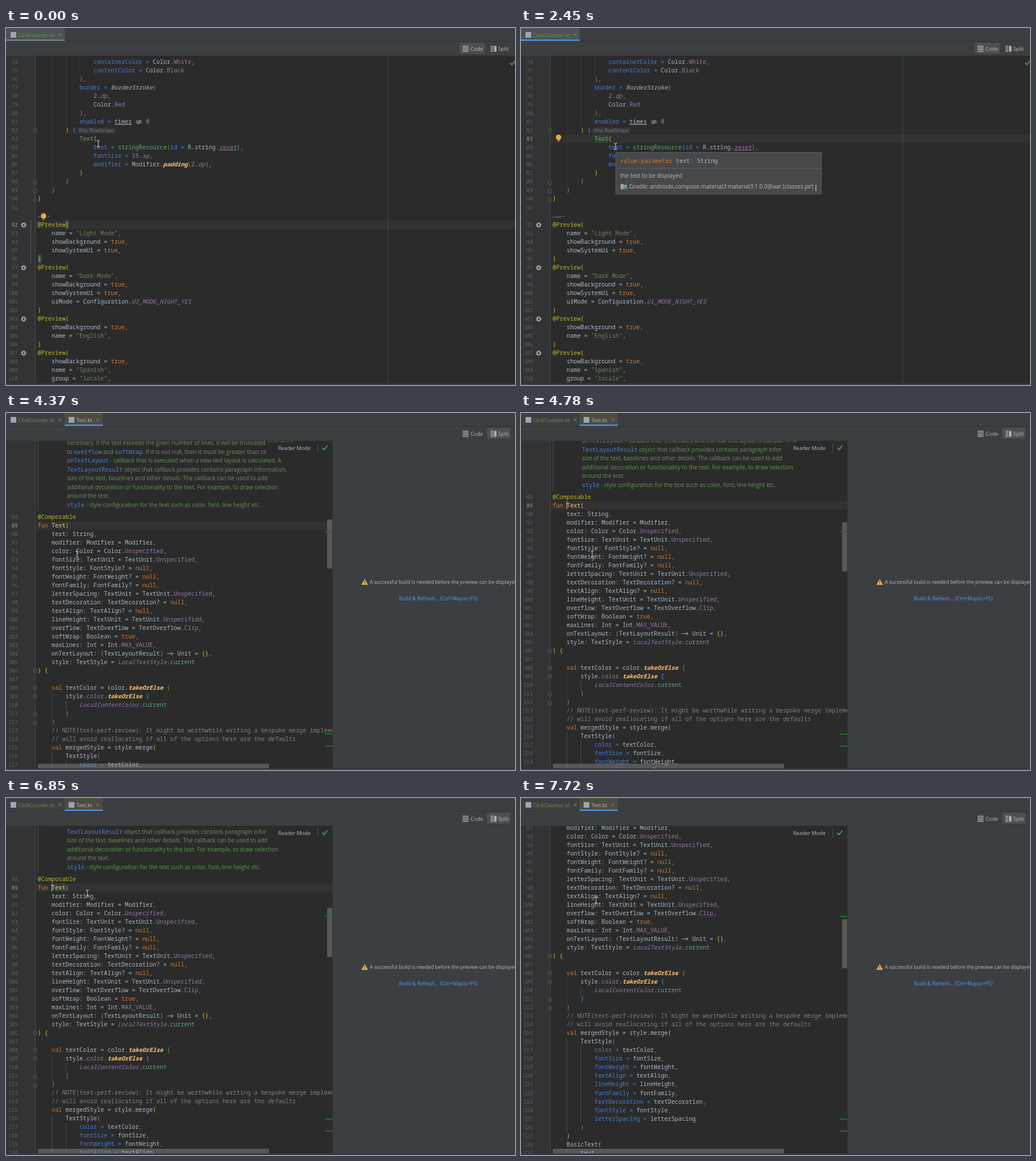
These frames come from a looping animation (894 by 627 pixels, 7850 ms). An HTML page:

```html
<!DOCTYPE html>
<html lang="en">
<head>
<meta charset="utf-8">
<title>Code editor</title>
<style>
html, body { margin: 0; width: 100%; height: 100%; overflow: hidden; background: #3c3f41; }
#stage { position: relative; width: 894px; height: 627px; overflow: hidden; background: #3c3f41;
  font: 9.1px/15px "Open Sans", "Noto Sans", sans-serif; color: #bbb; }
#stage div, #stage svg.at { position: absolute; white-space: pre; }
svg.at { width: 1px; height: 1px; overflow: visible; fill: none; }
.view { left: 0; top: 48px; height: 576px; overflow: hidden; background: #2b2b2b; }
.layer { left: 0; top: -48px; }
.code, .num, .doc code { font-family: "Noto Sans Mono", "DejaVu Sans Mono", monospace; }
.code { left: 55.5px; font-size: 10.23px; color: #a9b7c6; }
.num { left: 0; width: 20.5px; text-align: right; font-size: 8.9px; color: #606366; }
.num.on { color: #a4a3a3; }
.doc { left: 107px; font-size: 10.02px; color: #629755; }
.doc code { font-size: 10.2px; color: #4683d9; }
.code b { font-weight: normal; }
.code .k { color: #cc7832; }
.code .s { color: #6a8759; }
.code .c { color: #808080; }
.code .d { color: #6897bb; }
.code .n { color: #467cda; }
.code .p, .code .q { color: #9876aa; }
.code .a { color: #bbb529; }
.code .g { color: #67a37c; }
.code .t { color: #ffc66d; }
.code .f { color: #ffc66d; font-weight: 600; }
.code .q, .code .f, .code .i { font-style: italic; }
.code .u { text-decoration: underline; }
.code .r1 { color: #e8ba36; }
.code .r2 { color: #54a857; }
.code .r3 { color: #359ff4; }
.raw .code b:not(.k):not(.c) { color: inherit; font-style: normal; font-weight: normal; }
.lig { width: 12.28px; height: 10px; vertical-align: -2px; fill: none; stroke: currentColor; }
.pick { background: #4c5052; border-radius: 2px; }
</style>
</head>
<body>
<div id="stage"></div>
<script>
const LOOP = 7850, PITCH = 15.03;
const stage = document.getElementById('stage');

function div(parent, css, html = '', cls = '') {
  const el = document.createElement('div');
  el.className = cls;
  el.style.cssText = css;
  el.innerHTML = html;
  parent.append(el);
  return el;
}
const bar = (parent, x, y, w, h, color) =>
  div(parent, `left:${x}px;top:${y}px;width:${w}px;height:${h}px;background:${color}`);
// y is the middle of the text line
const label = (parent, x, y, text, css = '') =>
  div(parent, `left:${x}px;top:${y - 7.5}px;${css}`, text);
function icon(parent, x, y, shapes) {
  parent.insertAdjacentHTML('beforeend',
    `<svg class="at" style="left:${x}px;top:${y}px">${shapes}</svg>`);
  return parent.lastElementChild;
}
const show = (el, on) => { el.style.display = on ? '' : 'none'; };

const LIG = {
  '≠': '<path d="M1 3.6H11.5M1 6.6H11.5M8.3 1L4.3 9.3"/>',
  '→': '<path d="M.5 5H11M8 2L11 5L8 8"/>'
};
function paint(src) {
  return src
    .replace(/"[^"]*"/g, '<b class=s>$&</b>')
    .replace(/,/g, '<b class=k>,</b>')
    .replace(/\b(true|null|fun|val)\b/g, '<b class=k>$1</b>')
    .replace(/@\w+/g, '<b class=a>$&</b>')
    .replace(/\[(\w+) (.*?)\]/g, '<b class=$1>$2</b>')
    .replace(/[≠→]/g, c => `<svg class=lig viewBox="0 0 12 10">${LIG[c]}</svg>`);
}
function codeLines(layer, first, yOf, src) {
  const nums = {};
  src.split('\n').forEach((line, i) => {
    const n = first + i, top = yOf(n) - 7.5;
    nums[n] = div(layer, `top:${top}px`, n, 'num');
    div(layer, `top:${top}px`, paint(line), 'code');
  });
  return nums;
}
const FOLD = 'fill="#2b2b2b" stroke="#686b6e" stroke-width=".8"';
const fold = (layer, y, end) => icon(layer, 51, y,
  `<path ${end ? 'transform="scale(1 -1)"' : ''} d="M-2.8-3.3H2.8V1L0 3.5L-2.8 1Z" ${FOLD}/><path d="M-1.4 0H1.4" stroke="#686b6e" stroke-width=".8"/>`);
const bulb = (layer, y) => icon(layer, 66, y,
  '<circle cy="-1" r="4.7" fill="#f2a93b"/><path d="M-2 4.2H2M-1.5 5.7H1.5" stroke="#a8a8a8"/>');
const check = (layer, x, y) => icon(layer, x, y,
  '<path d="M-4.5 0L-1.5 3.5L4.5-4" stroke="#499c54" stroke-width="2"/>');

// First file
const viewA = div(stage, 'width:894px', '', 'view');
const layA = div(viewA, '', '', 'layer');
const yA = n => 59.5 + (n - 74 + (n > 91)) * PITCH;
bar(layA, 0, 48, 51, 576, '#313335');
const rowA = bar(layA, 51, 0, 843, 15, '#323232');
bar(layA, 51, 48, 1, 576, '#48494b');
bar(layA, 670, 48, 1, 576, '#47494b');
bar(layA, 80, 48, 1, 230, '#373737');
bar(layA, 105, 48, 1, 125, '#373737');
bar(layA, 129, 48, 1, 34, '#373737');
const scope = bar(layA, 43, 338, 1, 75, '#5d6063');
const pairA = bar(layA, 104.4, 338, 6, 15, '#3b514d');
const pairB = bar(layA, 55.5, 398, 6.2, 15, '#3b514d');
const usage = bar(layA, 129, 188, 25, 14, '#344134');
const numsA = codeLines(layA, 73, yA,
`            [n colors =] ButtonDefaults.[i buttonColors][r2 (]
                [n containerColor =] Color.[p White],
                [n contentColor =] Color.[p Black]
            [r2 )],
            [n border =] [i BorderStroke][r2 (]
                [d 2].[q dp],
                Color.[p Red]
            [r2 )],
            [n enabled =] [u times] ≠ [d 0]
        [r1 )] [r3 {]
            [g Text][r1 (]
                [n text =] [g stringResource][r2 (][n id =] R.string.[q <u>reset</u>][r2 )],
                [n fontSize =] [d 15].[q sp],
                [n modifier =] Modifier.[f padding][r2 (][d 2].[q dp][r2 )],
            [r1 )]
        [r3 }]
    [r2 }]
[r1 }]

@Preview[r1 (]
    name = "Light Mode",
    showBackground = true,
    showSystemUi = true,
[r1 )]
@Preview[r1 (]
    name = "Dark Mode",
    showBackground = true,
    showSystemUi = true,
    uiMode = Configuration.[q UI_MODE_NIGHT_YES]
[r1 )]
@Preview[r1 (]
    showBackground = true,
    name = "English",
[r1 )]
@Preview[r1 (]
    showBackground = true,
    name = "Spanish",
    group = "locale",`);
[82, 88, 89, 90].forEach(n => fold(layA, yA(n) + 1, n > 82));
[92, 97, 103, 107].forEach(n => icon(layA, 31, yA(n) + .7,
  '<g stroke="#afb1b3"><circle r="2.6" stroke-width="1.5"/><circle r="4" stroke-width="1.5" stroke-dasharray="1.57"/></g>'));
div(layA, 'left:124px;top:175px;width:69px;height:11px;background:#353637;border-radius:3px');
label(layA, 128, 180, 'this: RowScope', 'font-size:8.7px;color:#7d7f81');
label(layA, 55.5, 330.5, 'new *', 'font-size:8px;color:#787878');
check(layA, 890, 61);
const bulbOld = bulb(layA, 331), bulbNew = bulb(layA, 193);
const caretA = bar(layA, 141, 189, 1.4, 13, '#d0d0d0');

const popup = div(layA, 'left:166px;top:218px;width:360px;height:72px;background:#46484a;border:1px solid #5b5d5f');
bar(popup, 0, 27, 360, 1, '#5b5d5f');
div(popup, 'left:7px;top:7px', '<b class=k>value-parameter</b> text: String', 'code');
label(popup, 7, 40, 'the text to be displayed', 'font-size:10px');
label(popup, 23, 59, 'Gradle: androidx.compose.material3:material3:1.0.0@aar (classes.jar)', 'font-size:10.02px');
icon(popup, 8, 54, '<path d="M0 1H4L5.5 2.5H11V10H0Z" fill="#9aa7b0"/><path d="M6 10V5M8.3 10V4M10.6 10V6" stroke="#46484a"/><path d="M7 10V5M9.4 10V4M11.6 10V6" stroke="#62a3c4" stroke-width="1.2"/>');
icon(popup, 350.5, 62, '<g fill="#ccc"><circle cy="-4" r="1.2"/><circle r="1.2"/><circle cy="4" r="1.2"/></g>');

// Second file
const viewB = div(stage, 'width:573px', '', 'view');
bar(viewB, 0, 0, 51, 576, '#313335');
const layB = div(viewB, '', '', 'layer');
const yB = n => (n - 88) * PITCH;
bar(layB, 51, 7.5, 522, 15, '#323232');
bar(viewB, 51, 0, 1, 576, '#48494b');
bar(layB, 56, -300, 1, 290, '#4a5547');
const guide = (x, from, to, color) =>
  bar(layB, x, yB(from) - 7, 1, (to - from + 1) * PITCH, color);
guide(80, 109, 111, '#3d443b');
guide(105, 110, 110, '#4a4d50');
guide(80, 116, 126, '#5e4c38');
guide(105, 117, 125, '#3e4f3e');
guide(80, 129, 135, '#5e4c38');
const usageB = bar(layB, 80, 8, 25, 14, '#344134');
[
  'the text will be positioned as if there was unlimited horizontal space. If `softWrap` is',
  'false, `overflow` and TextAlign may have unexpected effects.',
  '`maxLines` - an optional maximum number of lines for the text to span, wrapping if',
  'necessary. If the text exceeds the given number of lines, it will be truncated according',
  'to `overflow` and `softWrap`. If it is not null, then it must be greater than zero.',
  '`onTextLayout` - callback that is executed when a new text layout is calculated. A',
  '`TextLayoutResult` object that callback provides contains paragraph information,',
  'size of the text, baselines and other details. The callback can be used to add',
  'additional decoration or functionality to the text. For example, to draw selection',
  'around the text.',
  '`style` - style configuration for the text such as color, font, line height etc.'
].forEach((line, i) => div(layB, `top:${-28.5 - (10 - i) * 15.45}px`,
  line.replace(/`(\w+)`/g, '<code>$1</code>'), 'doc'));
const numsB = codeLines(layB, 88, yB,
`@Composable
fun [t Text](
    text: String,
    modifier: Modifier = Modifier,
    color: Color = Color.[p Unspecified],
    fontSize: TextUnit = TextUnit.[p Unspecified],
    fontStyle: FontStyle? = null,
    fontWeight: FontWeight? = null,
    fontFamily: FontFamily? = null,
    letterSpacing: TextUnit = TextUnit.[p Unspecified],
    textDecoration: TextDecoration? = null,
    textAlign: TextAlign? = null,
    lineHeight: TextUnit = TextUnit.[p Unspecified],
    overflow: TextOverflow = TextOverflow.[p Clip],
    softWrap: Boolean = true,
    maxLines: Int = Int.[p MAX_VALUE],
    onTextLayout: [r2 (]TextLayoutResult[r2 )] → Unit = [r1 {}],
    style: TextStyle = [q LocalTextStyle].[g current]
[r1 )] [r1 {]

    val textColor = color.[f takeOrElse] [r2 {]
        style.[p color].[f takeOrElse] [r3 {]
            [q LocalContentColor].[g current]
        [r3 }]
    [r2 }]
    [c // NOTE(text-perf-review): It might be worthwhile writing a bespoke merge implementation as this]
    [c // will avoid reallocating if all of the options here are the defaults]
    val mergedStyle = style.merge[r1 (]
        TextStyle[r2 (]
            [n color =] textColor,
            [n fontSize =] fontSize,
            [n fontWeight =] fontWeight,
            [n textAlign =] textAlign,
            [n lineHeight =] lineHeight,
            [n fontFamily =] fontFamily,
            [n textDecoration =] textDecoration,
            [n fontStyle =] fontStyle,
            [n letterSpacing =] letterSpacing
        [r2 )]
    [r1 )]
    BasicText[r1 (]
        text,
        modifier,
        mergedStyle,`);
numsB[89].classList.add('on');
[106, 108, 109, 111, 112].forEach(n => fold(layB, yB(n) + 1, n > 110));
const caretB = bar(layB, 79.6, 8.5, 1.5, 13, '#d8d8d8');
const thumb = bar(viewB, 564, 0, 8.5, 86, 'rgba(166,166,166,.36)');
bar(viewB, 56, 568, 406, 8, 'rgba(166,166,166,.36)');

const reader = div(viewB, 'left:0;top:-48px');
bar(reader, 458, 51, 115, 21, '#2b2b2b');
label(reader, 478, 61, 'Reader Mode');
bar(reader, 547, 53, 1, 16, '#4d5052');
check(reader, 560, 61);
[207, 563, 584].forEach(y => bar(reader, 560, y, 13, 2, '#1d7322'));

const side = div(stage, 'left:573px;top:48px;width:321px;height:576px;overflow:hidden;background:#3c3f41');
bar(side, 0, 0, 1, 576, '#323232');
const notice = div(side, 'left:0;top:0');
icon(notice, 56.5, 249, '<path d="M0-4.6L5 4.3H-5Z" fill="#edb04b" stroke="#edb04b" stroke-linejoin="round"/><path d="M0-2.2V1.4M0 2.4V3.7" stroke="#3c3f41" stroke-width="1.2"/>');
label(notice, 66, 249, 'A successful build is needed before the preview can be displayed', 'font-size:8.65px');
label(notice, 117.5, 278, 'Build &amp; Refresh... (Ctrl+Mayús+F5)', 'font-size:8.72px;color:#589df6');

// Tabs and toolbar
bar(stage, 0, 23, 894, 1, '#323232');
bar(stage, 0, 47.5, 894, 1, '#35383a');
bar(stage, 0, 624, 894, 1, '#323232');
const tabA = bar(stage, 0, 0, 103, 23, '#4e5254');
const lineA = bar(stage, 0, 20, 103, 3, '#747a80');
const tabB = div(stage, 'left:103px;top:0;width:67px;height:23px;background:#4e4b41');
bar(tabB, 0, 20, 67, 3, '#4a88c7');
function tabFace(parent, x, name, color, close) {
  bar(parent, x, 7, 10, 10, '#9aa7b0');
  label(parent, x + 13.5, 12.5, name, `color:${color}`);
  icon(parent, close, 12, '<path d="M-2.6-2.6L2.6 2.6M2.6-2.6L-2.6 2.6" stroke="#7f8385"/>');
}
tabFace(stage, 8, 'ClickCounter.kt', '#629755', 94.5);
tabFace(tabB, 7, 'Text.kt', '#bbb', 57.5);
const pickCode = div(stage, 'left:797px;top:26px;width:44px;height:19px', '', 'pick');
const pickSplit = div(stage, 'left:845px;top:26px;width:41px;height:19px', '', 'pick');
const ROWS = 'M0 0H10.5M0 3H10.5M0 6H10.5M0 9H10.5';
icon(stage, 802, 31.5, `<path d="${ROWS}" stroke="#afb1b3" stroke-width="1.3"/>`);
icon(stage, 851, 31.5, '<path d="M0 0H5M0 3H5M0 6H5M0 9H5" stroke="#afb1b3" stroke-width="1.3"/><path d="M6.2-.6H10.5V9.6H6.2Z" fill="#afb1b3"/>');
label(stage, 816, 36.5, 'Code');
label(stage, 864.5, 36.5, 'Split');

const beam = icon(stage, 0, 0,
  '<path d="M-2.7-5.7Q0-5.7 0-4Q0-5.7 2.7-5.7M0-4.5V4.5M-2.7 5.7Q0 5.7 0 4Q0 5.7 2.7 5.7" stroke="#d6d6d6"/>');
const arrow = icon(stage, 0, 0,
  '<path d="M0 0V11.2L2.6 8.8L4.2 12.4L5.9 11.6L4.3 8.1H7.8Z" fill="#fff" stroke="#222" stroke-width=".6"/>');

// Keys are [time, value, ...], joined by straight pieces
const MOUSE = [[50, 162, 203], [125, 144, 199], [770, 144, 199], [860, 166, 208], [3000, 166, 208],
  [3070, 165, 207.5], [3280, 165, 207.5], [3750, 125, 248], [5200, 125, 248], [5820, 140, 41],
  [6080, 136, 8], [6300, 136, 8], [6640, 143, 162], [6850, 143, 167], [6920, 143, 167],
  [7450, 139.5, 179], [7720, 132, 179]];
const SCROLL = [[3990, 232], [4200, 187], [4330, 186.9], [4560, 158], [4780, 146.5], [4845, 146.5],
  [4930, 141.8], [5040, 141.8], [5140, 131.5], [5195, 131.5], [5400, 96.7], [5580, 96.7],
  [5820, 141.8], [6900, 141.8], [7080, 96.7], [7260, 51.6], [7450, 6.5]];
function at(keys, t, i = 1) {
  const k = keys.findIndex(key => key[0] > t);
  if (k === 0) return keys[0][i];
  if (k < 0) return keys[keys.length - 1][i];
  const a = keys[k - 1], b = keys[k];
  return a[i] + (b[i] - a[i]) * (t - a[0]) / (b[0] - a[0]);
}
const within = (t, ...spans) => spans.some(([a, b]) => t >= a && t < b);

function draw(t) {
  const second = t >= 3070, clicked = t >= 525;
  const split = t >= 3350, ready = t >= 3550;

  show(viewA, !second);
  show(tabA, !second);
  show(lineA, !second);
  lineA.style.background = t >= 460 ? '#4a88c7' : '#747a80';
  rowA.style.top = yA(clicked ? 83 : 92) - 7.5 + 'px';
  numsA[83].classList.toggle('on', clicked);
  numsA[92].classList.toggle('on', !clicked);
  [scope, pairA, pairB].forEach(el => show(el, !clicked));
  show(bulbOld, t < 590);
  show(usage, t >= 590);
  show(bulbNew, within(t, [1590, 2790]));
  show(popup, within(t, [1460, 2730]));
  show(caretA, within(t, [525, 1460], [1990, 2450]));

  [viewB, side, tabB].forEach(el => show(el, second));
  show(notice, split);
  show(pickCode, !split);
  show(pickSplit, split);
  show(reader, ready);
  layB.classList.toggle('raw', !ready);
  const y = at(SCROLL, t);
  layB.style.transform = `translateY(${y}px)`;
  thumb.style.top = (ready ? 145 + (141.8 - y) * .148 : 112) + 'px';
  thumb.style.height = (ready ? 86 : 89) + 'px';
  show(caretB, !within(t, [4200, 4650], [5300, 5800], [6200, 6600]));
  show(usageB, t >= 6300);

  const mx = at(MOUSE, t, 1), my = at(MOUSE, t, 2);
  const pointing = within(t, [3070, 3420]) || my < 48;
  show(beam, !pointing);
  show(arrow, pointing);
  [beam, arrow].forEach(el => { el.style.transform = `translate(${mx}px,${my}px)`; });
}
const start = performance.now();
function tick() {
  draw((performance.now() - start) % LOOP);
  requestAnimationFrame(tick);
}
tick();
</script>
</body>
</html>
```
